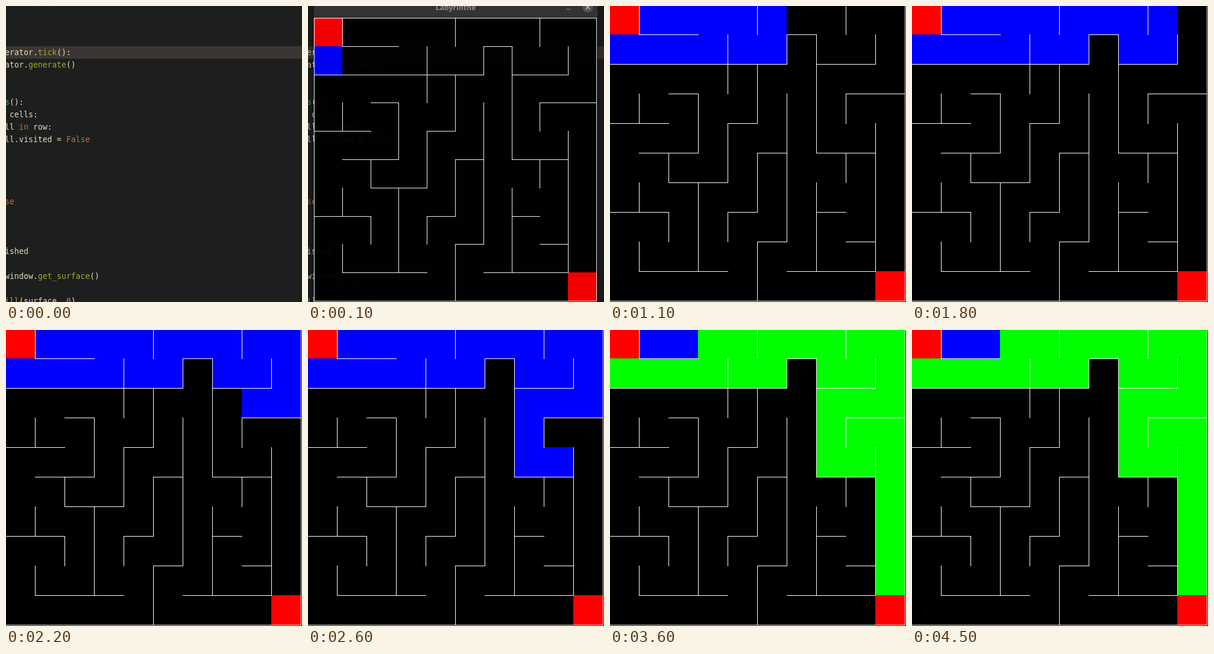
Write an HTML page with a canvas that moves like this. It is 501 px wide and 500 px high and loops after 5400 ms.

```html
<!DOCTYPE html>
<html lang="en">
<head>
<meta charset="utf-8">
<title>Maze search</title>
<style>
  html, body { margin: 0; width: 100%; height: 100%; overflow: hidden; background: #000; }
  canvas { display: block; width: 501px; height: 500px; }
</style>
</head>
<body>
<canvas id="stage" width="501" height="500"></canvas>
<script>
const ctx = document.getElementById('stage').getContext('2d');
const LOOP = 5400, SOLVED = 3600, GRID = 10;

const INK = { w: '#e6d8b4', g: '#a4a631', t: '#689d6a', o: '#c1703a', p: '#a8859a' };

// Each line: row, then pairs of colour key and text.
const CODE = [
  [-4, 'w', '      (   )'],
  [0, 'w', 'erator.', 'g', 'tick', 'w', '():'],
  [1, 'w', 'ator.', 'g', 'generate', 'w', '()'],
  [4, 't', 's', 'w', '():'],
  [5, 'w', ' cells:'],
  [6, 'w', 'll ', 'o', 'in', 'w', ' row:'],
  [7, 'w', 'll.visited = ', 'o', 'False'],
  [12, 'o', 'se'],
  [16, 'w', 'ished'],
  [18, 'w', 'window.', 'g', 'get_surface', 'w', '()'],
  [20, 'g', 'ill', 'w', '(surface, ', 'p', '0', 'w', ')']
];

// Walls per inner grid line, as "from-to" spans in cells.
const VERTICAL = ['0-1 3-4 6-7 8-9', '5-6 7-8', '3-5 6-9', '1-3 4-6 7-8', '0-1 2-4 5-7 8-10',
  '1-2 3-8', '1-5 6-9', '0-1 3-4 5-6', '1-2 4-9'];
const HORIZONTAL = ['1-3 6-7', '0-6 7-9', '2-3 8-10', '0-2 4-5', '1-3 5-6 7-9',
  '2-4', '0-2 4-5 7-8', '5-6 8-9', '1-4 6-9'];
const parseSpans = line => line.split(' ').map(s => s.split('-').map(Number));
const vWalls = VERTICAL.map(parseSpans), hWalls = HORIZONTAL.map(parseSpans);

const STEP = { U: [0, -1], D: [0, 1], L: [-1, 0], R: [1, 0] };
const path = [];
let px = 0, py = 0;
for (const move of 'DRRRURDRURRDRURDDLLDDRURDDDDD') {
  px += STEP[move][0];
  py += STEP[move][1];
  path.push([px, py]);
}
const deadEnd = [[2, 0], [1, 0]], deadEndLevel = 6;

// Moment at which each search level appears.
const run = (from, to) => Array.from({ length: (to - from) / 100 + 1 }, (_, i) => from + i * 100);
const levelTimes = [100, 200, 400, ...run(400, 700), 1100, 1100, ...run(1300, 1600),
  ...run(1800, 2600), ...run(2800, 3100), 3300, ...run(3300, 3400)];

function box(color, x, y, w, h) {
  ctx.fillStyle = color;
  ctx.fillRect(x, y, w, h);
}

function drawCode() {
  box('#1c1f1e', 0, 0, 501, 500);
  box('#3a3633', 0, 68, 501, 21);
  ctx.font = '13.29px "DejaVu Sans Mono", monospace';
  ctx.textAlign = 'left';
  for (const [row, ...parts] of CODE) {
    let x = -2;
    for (let i = 0; i < parts.length; i += 2) {
      ctx.fillStyle = INK[parts[i]];
      ctx.fillText(parts[i + 1], x, 83 + row * 21);
      x += parts[i + 1].length * 8;
    }
  }
}

function drawMaze(t, left, top, size) {
  const X = i => left + Math.round(i * size);
  const Y = j => top + Math.round(j * size);
  const cell = (color, [c, r]) => box(color, X(c), Y(r), X(c + 1) - X(c), Y(r + 1) - Y(r));
  const vLine = (i, a, b) => box('#fff', X(i), Y(a), 1, Y(b) - Y(a) + 1);
  const hLine = (j, a, b) => box('#fff', X(a), Y(j), X(b) - X(a) + 1, 1);

  box('#000', X(0), Y(0), X(GRID) - X(0) + 2, Y(GRID) - Y(0) + 2);
  const level = levelTimes.filter(at => at <= t).length;
  const trail = t >= SOLVED ? '#0f0' : '#00f';
  path.slice(0, level).forEach(p => cell(trail, p));
  deadEnd.slice(0, Math.max(0, level - deadEndLevel + 1)).forEach(p => cell('#00f', p));
  cell('#f00', [0, 0]);
  cell('#f00', [9, 9]);

  vWalls.forEach((spans, i) => spans.forEach(([a, b]) => vLine(i + 1, a, b)));
  hWalls.forEach((spans, j) => spans.forEach(([a, b]) => hLine(j + 1, a, b)));
  for (const edge of [0, GRID]) {
    vLine(edge, 0, GRID);
    hLine(edge, 0, GRID);
  }
}

function drawWindow(t) {
  drawCode();
  box('rgba(0,0,0,.2)', 0, 0, 501, 500);
  ctx.globalAlpha = 0.95;
  box('#353535', 10, 0, 480, 20);
  drawMaze(t, 10, 20, 47.8);

  ctx.font = 'bold 12.5px "Open Sans", sans-serif';
  ctx.textAlign = 'center';
  ctx.fillStyle = '#929292';
  ctx.fillText('Labyrinthe', 250, 7);
  box('#929292', 437, 5, 8, 1);
  ctx.fillStyle = '#565656';
  ctx.beginPath();
  ctx.arc(473.5, 2, 9, 0, Math.PI * 2);
  ctx.fill();
  ctx.strokeStyle = '#c8c8c8';
  ctx.lineWidth = 1.5;
  ctx.beginPath();
  ctx.moveTo(470, -1.5);
  ctx.lineTo(477, 5.5);
  ctx.moveTo(477, -1.5);
  ctx.lineTo(470, 5.5);
  ctx.stroke();
  ctx.globalAlpha = 1;
}

function draw(t) {
  if (t < 100) drawCode();
  else if (t < 200) drawWindow(t);
  else {
    box('#000', 0, 0, 501, 500);
    drawMaze(t, -1, -2, 50);
  }
}

const start = performance.now();
function tick() {
  draw((performance.now() - start) % LOOP);
  requestAnimationFrame(tick);
}
tick();
</script>
</body>
</html>
```
